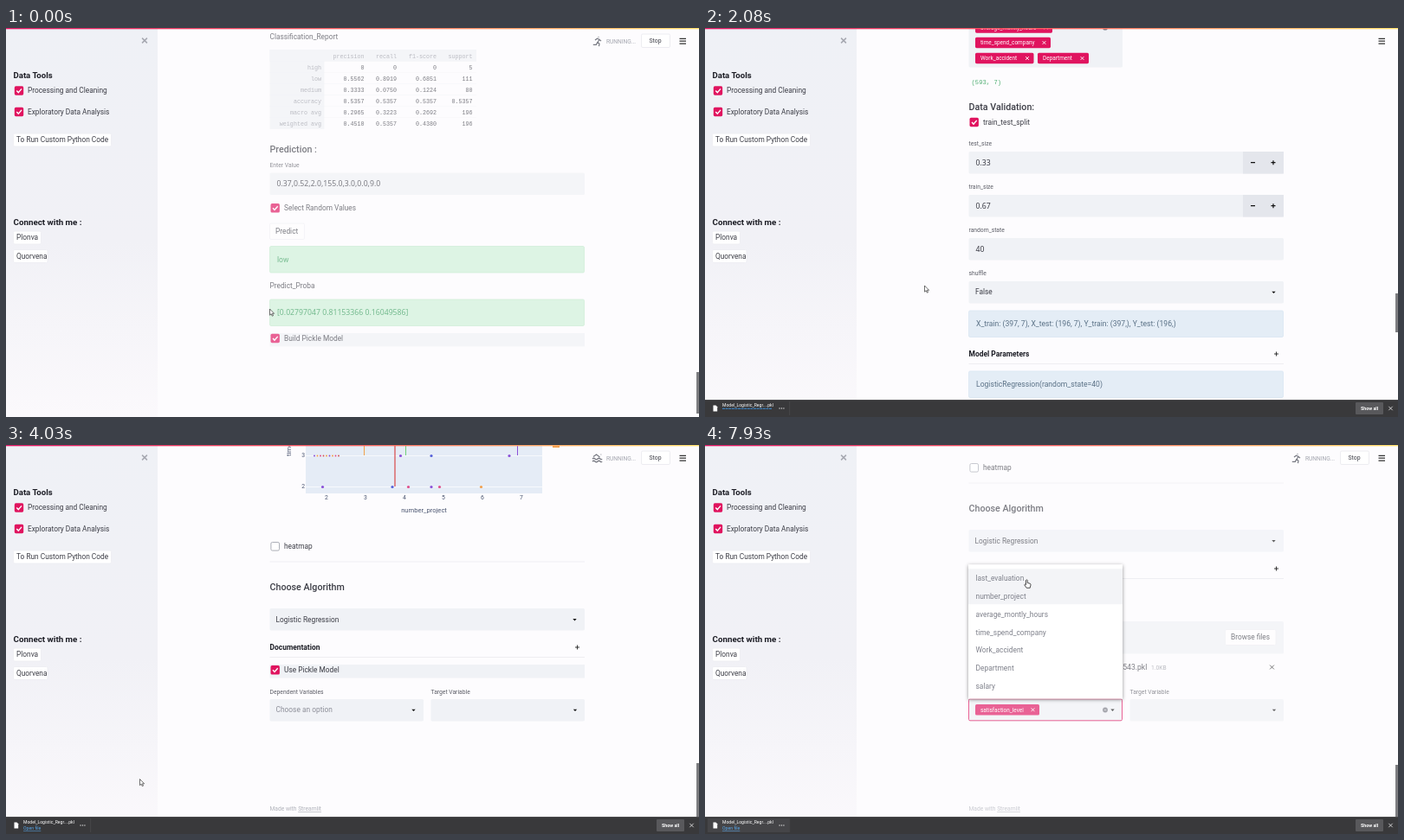
Write an HTML page that moves like this. It is 800 by 450 pixels and loops after 8 s.

```html
<!DOCTYPE html>
<html lang="en">
<head>
<meta charset="utf-8">
<style>
html, body { margin: 0; height: 100%; overflow: hidden; background: #fdfcfe; }
svg { display: block; width: 800px; height: 450px; font-family: Roboto, Inter, sans-serif; }
.num { font-family: "Noto Sans", "Open Sans", sans-serif; }
.mono { font-family: "Liberation Mono", monospace; }
text { white-space: pre; }
</style>
</head>
<body>
<svg id="stage" viewBox="0 0 800 450"></svg>
<script>
const PINK = '#e0145f', INK = '#3c3d46', GREY = '#9a9ca5', FIELD = '#f0f2f6', GREEN = '#3f7a58';

// Drawing helpers: each returns markup; text is placed by its vertical middle.
const text = (x, y, s, size = 8.33, fill = INK, extra = '') =>
  `<text x="${x}" y="${y + size * .355}" font-size="${size}" fill="${fill}" ${extra}>${s}</text>`;
const num = (x, y, s, fill = INK) => text(x, y, s, 8.7, fill, 'class="num"');
const mono = (x, y, s, size, fill, anchor = 'end') =>
  text(x, y, s, size, fill, `class="mono" text-anchor="${anchor}"`);
const label = (x, y, s) => text(x, y, s, 6.75, '#5c5d66');
const head = (y, s) => text(304.5, y, s, 10.7, INK, 'font-weight="500"');
const bold = (x, y, s, size = 8.45) => text(x, y, s, size, '#1c1d25', 'font-weight="700"');
const rect = (x, y, w, h, fill, extra = '') =>
  `<rect x="${x}" y="${y}" width="${w}" height="${h}" fill="${fill}" ${extra}/>`;
const path = (d, stroke, w = 1, fill = 'none', extra = '') =>
  `<path d="${d}" stroke="${stroke}" stroke-width="${w}" fill="${fill}" ${extra}/>`;
const group = (id, body) => `<g id="${id}">${body}</g>`;
const line = y => rect(304.5, y, 363.5, .6, '#e4e5ea');
const cross = (x, y, r, c, w = 1) => path(`M${x - r} ${y - r}l${2 * r} ${2 * r}m0 ${-2 * r}l${-2 * r} ${2 * r}`, c, w);
const field = (x, y, w, h = 25.5) => rect(x, y, w, h, FIELD, 'rx="1.5"');
const arrow = (x, y) => path(`M${x - 2.2} ${y - 1}h4.4l-2.2 2.4z`, 'none', 0, '#111');
const plus = y => path(`M657 ${y}h5m-2.5 -2.5v5`, '#222', .9);
const button = (x, y, w, h, s) =>
  rect(x, y, w, h, '#fff', 'rx="1.5" stroke="#ececf1" stroke-width=".8"') + text(x + 3.5, y + h / 2, s);
const check = (x, y, on) => on
  ? rect(x - 5.2, y - 5.2, 10.4, 10.4, PINK, 'rx="1.6"') + path(`M${x - 2.7} ${y}l2 2.1 3.7 -4.2`, '#fff', 1.4)
  : rect(x - 4.8, y - 4.8, 9.6, 9.6, '#fff', 'rx="1.6" stroke="#a3a6af" stroke-width=".9"');
const option = (y, s, on) => check(310.7, y, on) + text(321, y, s);
const alertBox = (y, h, fill, edge) =>
  rect(304.5, y, 363, h, fill, `rx="1.5" stroke="${edge}" stroke-width=".7"`);
const info = (y, s) => alertBox(y, 30.5, '#e4edf6', '#d6e4f1') + text(313, y + 15.3, s, 8.6, '#5a7186');
const good = (y, h) => alertBox(y, h, '#cef0d7', '#b5e5c2');
const chip = (x, y, w, s) => rect(x, y - 6.2, w, 12.4, PINK, 'rx="1.6"') +
  text(x + 6, y, s, 6.45, '#fff') + cross(x + w - 7.5, y, 1.9, '#fff', .9);
const clearIcon = y => `<circle cx="462" cy="${y}" r="2.9" fill="#777982"/>` + cross(462, y, 1, '#fff', .6) + arrow(470.5, y);
const stepper = (y, name, value) => label(304.5, y, name) + field(304.5, y + 9, 363.5) +
  rect(621, y + 9, 47, 25.5, '#e4e6ec') + num(312.5, y + 21.7, value) +
  path(`M630 ${y + 21.7}h5m18.5 0h5m-2.5 -2.5v5`, '#111', 1.2);
const madeWith = y => text(304.5, y, 'Made with <tspan text-decoration="underline">Streamlit</tspan>', 6.7, '#b0b2ba');

function chart() {
  const purple = '#8a50d8', pink = '#e0508c', orange = '#f2a04c', blue = '#5560d8', axis = '#4a5570';
  const dot = ([x, y, c, r = 1.6]) => `<circle cx="${x}" cy="${y}" r="${r}" fill="${c}"/>`;
  const tick = (x, y, s, anchor = 'middle', size = 6.8) => text(x, y, s, size, axis, `text-anchor="${anchor}"`);
  const tints = [purple, orange, pink, '#d35a5a', orange];
  return rect(346, -120, 273, 176, '#e5ecf6') +
    [2, 3, 4, 5, 6, 7].map((n, i) => tick(370 + 45 * i, 61, n)).join('') +
    rect(346, 12, 273, .7, '#fff') + rect(346, 48, 273, .7, '#fff') +
    tick(345, 12, 3, 'end') + tick(345, 48, 2, 'end') +
    tick(482.5, 75, 'number_project', 'middle', 7.6) +
    text(0, 0, 'time_spend_company', 7.6, axis, 'transform="translate(326 13) rotate(-90)"') +
    path('M449 -120V48', '#d84848', 1.2) + path('M413.5 -120V12', orange) +
    path('M461.5 -120V12', '#6fcf7a') + path('M590.5 -120V12', purple) + rect(631, 0, 8, 3, orange) +
    Array.from({ length: 9 }, (_, i) => dot([356 + i * 3.5, 12.5, tints[i % 5], 1])).join('') +
    [[455.5, 12.5, purple], [491, 12.5, blue], [581, 12.5, purple], [365.5, 48.5, purple], [446, 48.5, blue],
     [464.5, 48.5, pink], [491, 48.5, purple], [500.5, 48.5, pink], [548.5, 48.5, orange]].map(dot).join('');
}

function coefficients() {
  let seed = 7;
  const rnd = () => (seed = seed * 16807 % 2147483647) / 2147483647;
  const lines = Array.from({ length: 6 }, () =>
    [0, 0, 0].map(() => (rnd() * .4 - .15).toFixed(17)).join(', ') + ',');
  lines.push('-0.06281018792559584, 0.08841276531206632], [0.18691014479339024,',
    '0.08135386073057792, 0.06314969104154075, -0.0003073747581123042,',
    '0.21757201166629683, 0.11862075132134324, -0.1133978300169119]');
  return lines.map((s, i) => num(313, 889.5 - (8 - i) * 12.9, s, GREEN)).join('');
}

function report() {
  const rows = ['. precision recall f1-score support', 'high 0 0 0 5', 'low 0.5562 0.8919 0.6851 111',
    'medium 0.3333 0.0750 0.1224 80', 'accuracy 0.5357 0.5357 0.5357 0.5357',
    'macro_avg 0.2965 0.3223 0.2692 196', 'weighted_avg 0.4510 0.5357 0.4380 196'];
  const right = [364, 413.5, 451, 497, 538.5];
  return rect(304.5, 1023, 238.5, 13.5, FIELD) + rect(304.5, 1023, 63, 92, FIELD) +
    rows.map((row, r) => rect(304.5, 1023 + r * 13.05, 238.5, .4, '#eceef3') +
      row.split(' ').map((s, c) => s === '.' ? '' :
        mono(right[c], 1030.5 + r * 13, s.replace('_', ' '), 6.7, r && c ? INK : GREY)).join('')).join('');
}

const bodyA = label(304.5, 197, 'Dependent Variables') + label(490.5, 197, 'Target Variable') +
  field(304.5, 206, 177.5, 91.5) + field(490.5, 206, 177.5) + text(498, 218.5, 'salary') + arrow(657, 218.5) +
  chip(312, 216, 74, 'satisfaction_level') + chip(312, 234, 68, 'last_evaluation') +
  chip(385, 234, 69.5, 'number_project') + chip(312, 251.5, 89, 'average_montly_hours') +
  chip(312, 269, 87, 'time_spend_company') + chip(312, 287, 67.5, 'Work_accident') +
  chip(384, 287, 59, 'Department') + clearIcon(251.7) +
  mono(493, 246, '(593,)', 7.2, '#4fae72', 'start') + mono(307.5, 314, '(593, 7)', 7.2, '#4fae72', 'start') +
  head(343, 'Data Validation:') + option(361, 'train_test_split', true) +
  stepper(386, 'test_size', '0.33') + stepper(436, 'train_size', '0.67') +
  label(304.5, 486, 'random_state') + field(304.5, 495, 363.5) + num(312.5, 507.5, '40') +
  label(304.5, 536, 'shuffle') + field(304.5, 545, 363.5) + text(312, 557.5, 'False') + arrow(656.5, 557.7) +
  info(579, 'X_train: (397, 7), X_test: (196, 7), Y_train: (397,), Y_test: (196,)') +
  bold(304.5, 629, 'Model Parameters') + plus(629) + line(640) +
  info(649, 'LogisticRegression(random_state=40)') +
  text(304.5, 695, 'Classes_') + good(710, 30.5) + text(313, 725, 'high, low, medium', 8.4, GREEN) +
  text(304.5, 756, 'Coef_') + good(773, 132) + coefficients() +
  text(304.5, 920.5, 'Intercept_') + good(935, 30.5) +
  num(313, 950.5, '-0.18324534678120658, -0.0366557120131984, 0.2199010587945781', GREEN) +
  head(989.7, 'Metrics :') + text(304.5, 1007.7, 'Classification_Report') + report() +
  head(1138, 'Prediction :') + label(304.5, 1156.7, 'Enter Value') + field(304.5, 1165.5, 363.5) +
  option(1206.3, 'Select Random Values', true) + button(304.5, 1224, 40, 18.5, '') + text(311, 1233.3, 'Predict') +
  group('before', num(312.5, 1178, '0.37,0.52,2.0,155.0,3.0,0.0,9.0') +
    good(1250.5, 30.5) + text(313, 1266, 'low', 8.6, '#2f9a57') + text(304.5, 1296.5, 'Predict_Proba') +
    good(1312, 30.5) + num(313, 1327, '[0.02797047 0.81153366 0.16049586]', '#2f9a57') +
    rect(304.5, 1351, 363.5, 15.5, FIELD) + option(1357, 'Build Pickle Model', true)) +
  group('after', num(312.5, 1178.5, '0.91,0.92,4.0,246.0,5.0,0.0,7.0') +
    option(1257, 'Build Pickle Model', true) + button(304.5, 1273, 69, 17.5, 'Download Model') + madeWith(1401));

const topPart = `<g transform="translate(0 -89)">${chart()}</g>` +
  option(28.3, 'heatmap', false) + line(45.7) + head(75, 'Choose Algorithm') +
  field(304.5, 100, 363.5) + text(311.5, 113, 'Logistic Regression') + arrow(656.5, 113) +
  group('unpicked', option(171.3, 'Use Pickle Model', false)) +
  group('pickFocus', rect(304.5, 165, 363.5, 15.5, FIELD)) +
  group('picked', option(171.3, 'Use Pickle Model', true));

const uploader = label(304.5, 197, 'Upload Pickle Model') + field(304.5, 206, 363.5, 37.5) +
  path('M317 229.5c-5 -.5 -5 -7 0 -7.5c1 -6 9 -6 10.5 -.5c5 .5 5 7.5 0 8zM322 228v-5m-2.5 2.5l2.5 -2.5 2.5 2.5', '#8d909a', 1.3) +
  text(340, 220.3, 'Drag and drop file here') + text(340, 232.7, 'Limit 5MB per file • PKL', 6.5, GREY) +
  button(600.5, 215.5, 58.5, 18, '') + text(607, 224.5, 'Browse files');
const upFile = path('M317.5 253.5h6l3 3v9h-9zM323.5 253.5v3h3', '#8d909a') +
  text(340, 259, 'Model_Logistic_Regression_5518983543.pkl', 8.6) + text(515, 259.7, '1.0KB', 6.7, GREY) +
  cross(654.5, 259, 2.4, '#333');

const bodyB = label(304.5, 285.3, 'Dependent Variables') + label(490.5, 285.3, 'Target Variable') +
  field(304.5, 294, 177.5) + field(490.5, 294, 177.5) + arrow(657, 306.7) +
  group('empty', text(311.5, 306.5, 'Choose an option', 8.4, '#8d8f99') + arrow(470.5, 306.7)) +
  group('chosen', chip(312, 306.3, 74, 'satisfaction_level') + clearIcon(306.5)) +
  group('focus', rect(304.5, 293.8, 177, 25, 'none', `rx="1.5" stroke="${PINK}"`)) + madeWith(421);

const names = ['satisfaction_level', 'last_evaluation', 'number_project', 'average_montly_hours',
  'time_spend_company', 'Work_accident', 'Department', 'salary'];
const menu = (n, lit, ink) => {
  const h = n * 20.8 + 9.6;
  return rect(304, 293.5 - h, 178, h, '#fff', 'filter="url(#shadow)"') +
    rect(304, 298.5 - h, 178, lit, '#f3f4f7') +
    names.slice(-n).map((s, i) => text(312.5, 279 - (n - 1 - i) * 20.8, s, 8.4, ink)).join('');
};

const sidebar = rect(0, 0, 175, 450, 'url(#side)') + cross(160, 14.5, 2.9, '#a6a8b1', 1.5) +
  bold(8.5, 55, 'Data Tools', 9.6) + check(15, 72.5, true) + text(25, 72.5, 'Processing and Cleaning') +
  check(15, 97, true) + text(25, 97, 'Exploratory Data Analysis') +
  button(8.5, 122, 113, 15, 'To Run Custom Python Code') + bold(8.5, 224.5, 'Connect with me :', 9.8) +
  button(8.5, 235, 32, 15, 'Plonva') + button(8.5, 256.5, 39.5, 15, 'Quorvena');

const bar = rect(0, 430, 800, 20, '#39393b') + rect(0, 430, 800, .6, '#555558') +
  group('lit', rect(3, 432, 94, 16, '#454548')) +
  path('M9.5 436.5h3l1.7 1.7v5.3h-4.7z', 'none', 0, '#fff') +
  text(20, 436, 'Model_Logistic_Regr....pkl', 5.1, '#fff') +
  group('loading', path('M20 440.3h57', '#3f8fd6', 1, 'none', 'stroke-dasharray="3 .6"')) +
  group('loaded', text(20, 443.3, 'Open file', 5.2, '#58a6ea', 'text-decoration="underline"')) +
  path('M85.5 440h6', '#fff', 1.2, 'none', 'stroke-dasharray="1.2"') + rect(97.5, 432, .6, 16, '#505053') +
  rect(751, 433, 32, 14, '#59595c', 'rx="1"') +
  text(767, 440, 'Show all', 5.3, '#fff', 'text-anchor="middle" font-weight="700"') + cross(791.5, 440, 2.2, '#ddd', .9);

const icons = [
  'M683.5 10.5l1 0M680 14l2.5 -1.8 2.5 1 -2 3.3 2 1.7 -.5 3M682.8 16.5l-1.5 2.8 -3.5 0M685 13.5l2 1.5',
  'M677 16q1.5 -1.5 3 0t3 0 3 0 2 0M677 19q1.5 -1.5 3 0t3 0 3 0 2 0M678 13.5l3.5 -2.5 4 3M686.5 11h.8',
  'M676 17a2.7 2.7 0 1 0 5.4 0a2.7 2.7 0 1 0 -5.4 0M683.5 17a2.7 2.7 0 1 0 5.4 0a2.7 2.7 0 1 0 -5.4 0M682 18v-3l-2 -1.5 2.5 -2.3 2 2h2M685 9.5h.8'];
const running = icons.map((d, i) => group('icon' + i, path(d, '#777982', 1.2))).join('') +
  text(693, 15.5, 'RUNNING...', 6.6, '#a3a5ae') +
  rect(733.5, 7, 33, 15.5, '#fff', 'rx="1.5" stroke="#e9e9ee" stroke-width=".8"') + text(742.5, 14.7, 'Stop', 6.9);

const stage = document.getElementById('stage');
stage.innerHTML = `<defs>
  <linearGradient id="side" x2="0" y2="1"><stop stop-color="#eff1f6"/><stop offset=".55" stop-color="#f1f1f6"/><stop offset="1" stop-color="#fbf9fc"/></linearGradient>
  <linearGradient id="rainbow"><stop stop-color="#df1463"/><stop offset=".5" stop-color="#f5605f"/><stop offset="1" stop-color="#ffe06a"/></linearGradient>
  <filter id="shadow" x="-10%" y="-10%" width="120%" height="120%"><feDropShadow dx="0" dy="1" stdDeviation="2.2" flood-opacity=".42"/></filter>
  </defs>` + rect(0, 0, 800, 450, '#fdfcfe') +
  group('top', topPart) + group('doc', bold(304.5, 145, 'Documentation') + plus(145) + line(156)) +
  group('pageA', bodyA) + group('upload', uploader + group('upFile', upFile)) + group('pageB', bodyB) +
  group('menu8', menu(8, 21, INK)) + group('menu7', menu(7, 41, '#7f818b')) + sidebar +
  rect(0, 0, 800, 1.3, 'url(#rainbow)') + group('running', running) +
  path('M777.5 12.3h7.5m-7.5 2.9h7.5m-7.5 2.9h7.5', '#333', 1.2) +
  group('thumb', rect(797, 0, 3, 1, '#7c7c80')) + group('bar', bar) +
  group('pointer', path('M0 0v7.2l1.7 -1.5 1.1 2.5 1.2 -.5 -1.1 -2.4h2.2z', '#333', .7, '#fff')) +
  group('hand', path('M-1 0q1 -1.2 1.8 0v3l3 .8q1 .4 .7 1.6l-.8 3.4h-4l-2.5 -3.6q.4 -1.2 1.8 0z', '#222', .8, '#fff'));

const $ = id => document.getElementById(id);
const show = (id, on) => $(id).setAttribute('display', on ? 'inline' : 'none');
const move = (id, x, y) => $(id).setAttribute('transform', `translate(${x} ${y})`);

function track(keys, t, i = 1) {
  let k = 0;
  while (k < keys.length - 1 && keys[k + 1][0] <= t) k++;
  const a = keys[k], b = keys[k + 1];
  return b ? a[i] + (b[i] - a[i]) * (t - a[0]) / (b[0] - a[0]) : a[i];
}

const scroll = [[0, 998], [389, 998], [390, 960], [1039, 960], [1040, 980], [1300, 980], [1560, 859],
  [2080, 252], [2600, 0]];
const mouse = [[0, 304.5, 325], [390, 312, 322], [910, 312, 322], [1300, 253.5, 298], [2080, 253.5, 298],
  [2600, 253.5, 292.5], [3100, 309, 170], [3500, 309, 170], [4030, 154.5, 386.5], [4350, 50, 438], [4700, 50, 438],
  [5300, 330, 225], [5600, 330, 225], [6000, 255, 269.5], [6500, 255, 269.5], [6900, 371, 305], [7100, 371, 305],
  [7400, 371, 134], [7540, 371, 134], [7930, 371.5, 156.5]];

function draw(t) {
  const within = (a, b) => t >= a && t < b;
  const rebuilt = t >= 390, pickled = t >= 3510, uploaded = t >= 5590, focused = t >= 6890, selected = t >= 7540;
  const extra = uploaded ? 91 : t >= 4160 ? 62 : 0;
  const shift = pickled ? 89 - extra : -track(scroll, t);
  const stale = !rebuilt || within(3250, 3510) || within(5850, 6500) || t >= 7670;

  for (const id of ['top', 'doc', 'pageA', 'upload']) move(id, 0, shift);
  for (const id of ['top', 'pageA', 'upload', 'pageB']) $(id).setAttribute('opacity', stale ? .66 : 1);
  show('before', !rebuilt);
  show('after', rebuilt);
  show('picked', t >= 3120);
  show('pickFocus', t >= 3120 && !focused);
  show('unpicked', t < 3120);
  show('pageA', !pickled);
  show('pageB', pickled);
  show('upload', extra > 0);
  show('upFile', uploaded);
  show('empty', !selected);
  show('chosen', selected);
  show('focus', focused);
  show('menu8', within(7020, 7540));
  show('menu7', selected);

  show('running', !rebuilt || within(3120, 4160) || within(5590, 6500) || selected);
  const sport = within(3120, 4160) ? 1 : within(5590, 6500) ? 2 : 0;
  icons.forEach((_, i) => show('icon' + i, i === sport));

  show('bar', t >= 1040);
  show('lit', t >= 4290);
  show('loading', t < 2340);
  show('loaded', t >= 2340);

  const [y, h] = !rebuilt ? [398, 48] : pickled ? [extra ? 370 : 368, 62] : [280 - shift / 9.33, 45];
  $('thumb').setAttribute('transform', `translate(0 ${y}) scale(1 ${h})`);

  const hand = within(390, 1040) || t >= 6760;
  show('pointer', !hand);
  show('hand', hand);
  move(hand ? 'hand' : 'pointer', track(mouse, t, 1), track(mouse, t, 2));
}

const start = performance.now();
function tick() {
  const t = (performance.now() - start) % 8000;
  draw(Math.floor(t / 130) * 130); // the picture advances in 130 ms steps
  requestAnimationFrame(tick);
}
tick();
</script>
</body>
</html>
```
